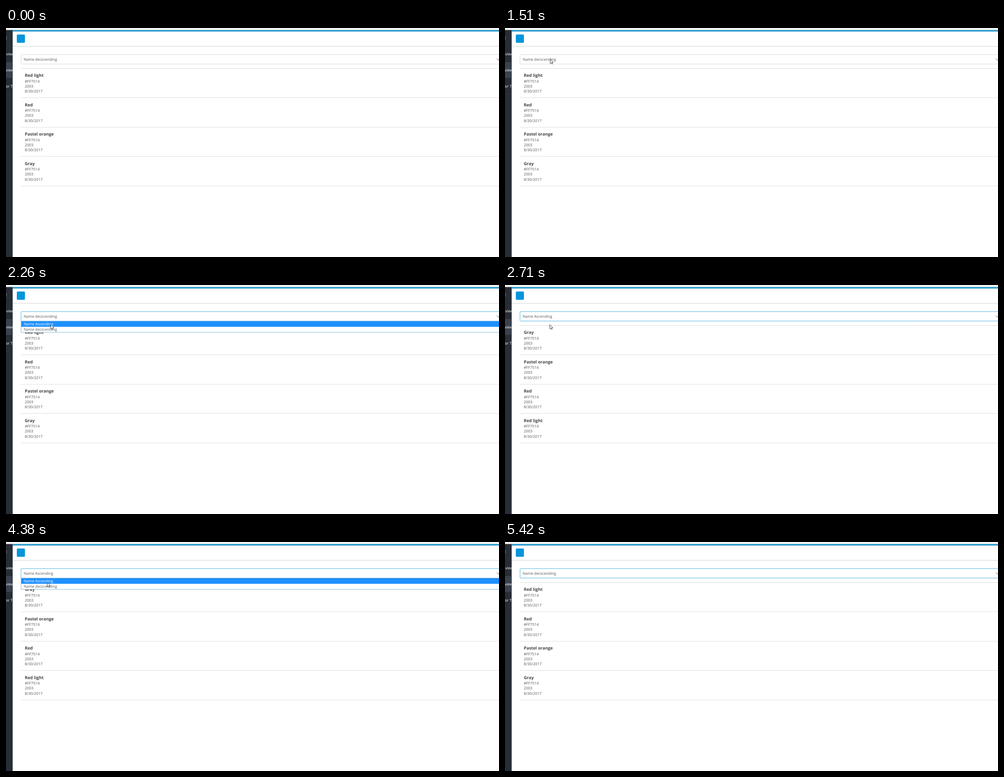
These frames come from a looping animation (1095x511 px, 6700 ms). An HTML page with a canvas:

```html
<!DOCTYPE html>
<html lang="en">
<head>
<meta charset="utf-8">
<title>Sorting a list</title>
<style>
html, body { margin: 0; width: 100%; height: 100%; overflow: hidden; background: #fff; }
canvas { display: block; }
</style>
</head>
<body>
<canvas id="stage" width="1095" height="511"></canvas>
<script>
const ctx = document.getElementById('stage').getContext('2d');
const LOOP = 6700, STEP = 56;
const OPTIONS = ['Name Ascending', 'Name decscending'];
const COLORS = ['Gray', 'Pastel orange', 'Red', 'Red light'];
const ARROW = new Path2D('M0 0V9.5L2.2 7.6 3.8 11 5.4 10.3 3.9 7H6.8Z');

// The pointer enters and leaves below the stage
const ENTRY = { x: 996, y: 528 };
const MOVES = [
  { start: 200, steps: 2, x: 508, y: 262 },
  { start: 480, steps: 3, x: 171, y: 70 },
  { start: 780, steps: 6, x: 136, y: 55 },
  { start: 1116, steps: 6, x: 102, y: 68 },
  { start: 1460, steps: 2, x: 99, y: 70 },
  { start: 2150, steps: 3, x: 99, y: 88 },
  { start: 3180, steps: 10, x: 92, y: 69 },
  { start: 4150, steps: 9, x: 91, y: 97 },
  { start: 4960, steps: 3, x: 558, y: 288 },
  { start: 5310, steps: 3, x: 1129, y: 520 }
];

const within = (t, from, to) => t >= from && t < to;
const easeOut = p => Math.sin(Math.min(1, p) * Math.PI / 2);

function pointerAt(t) {
  let { x, y } = ENTRY;
  for (const move of MOVES) {
    if (t < move.start) break;
    const step = Math.floor((t - move.start) / STEP + 0.05) + 1;
    const p = easeOut(step / move.steps);
    x += (move.x - x) * p;
    y += (move.y - y) * p;
  }
  return [Math.round(x), Math.round(y)];
}

function rect(color, x, y, w, h) {
  ctx.fillStyle = color;
  ctx.fillRect(x, y, w, h);
}

function text(str, x, y, color = '#555', font = '8.35px') {
  ctx.font = font + ' "Open Sans", sans-serif';
  ctx.fillStyle = color;
  ctx.fillText(str, x, y);
}

function roundBox(x, y, w, h, r) {
  ctx.beginPath();
  ctx.roundRect(x, y, w, h, r);
}

function drawHeader() {
  rect('#fff', 0, 0, 1095, 511);
  rect('#f1f5f5', 0, 0, 1095, 5);
  rect('#1994ca', 15, 4.6, 1080, 3.2);
  rect('#dedede', 15, 40, 1080, 1);
  rect('#eee', 15, 41, 1080, 1);
  ctx.fillStyle = '#0595db';
  roundBox(24, 14.5, 18, 18.5, 2);
  ctx.fill();
}

function drawSidebar() {
  ctx.save();
  ctx.beginPath();
  ctx.rect(0, 4.6, 14.8, 507);
  ctx.clip();
  rect('#272d36', 0, 4, 15, 507);
  rect('#39424e', 0, 76, 15, 35.5);
  rect('#2e353f', 0, 147, 15, 1);
  ['E', 'tview', 'view', 'or T'].forEach((label, i) =>
    text(label, i < 2 ? -2.5 : -0.5, 25.3 + i * 35.8, '#fff'));
  ctx.restore();
}

function drawList(names) {
  rect('#dcdcdc', 33, 90, 1062, 1);
  names.forEach((name, i) => {
    const top = 90 + i * 65.5;
    text(name, 41.7, top + 19.4, '#444', 'bold 9.5px');
    ['#FF7514', '2003', '8/30/2017'].forEach((line, j) =>
      text(line, 41.7, top + 31.5 + j * 11.3));
    rect('#dedede', 33, Math.round(top + 65.2), 1062, 1);
  });
}

function drawSelect(label, border) {
  ctx.strokeStyle = border;
  ctx.lineWidth = 1;
  roundBox(33.4, 59.4, 1070, 21, 1.5);
  ctx.stroke();
  text(label, 39.3, 73);
  ctx.strokeStyle = '#555';
  ctx.beginPath();
  ctx.moveTo(1090, 68);
  ctx.lineTo(1094, 72);
  ctx.lineTo(1098, 68);
  ctx.stroke();
}

function drawMenu(active) {
  rect('#fff', 33, 81, 1062, 25);
  ctx.strokeStyle = '#86b9da';
  ctx.strokeRect(33.5, 80.5, 1070, 25);
  rect('#1e90ff', 34, 81 + active * 12, 1061, 12.3);
  OPTIONS.forEach((name, i) =>
    text(name, 39.3, 90.3 + i * 12, i === active ? '#fff' : '#555'));
}

function drawPointer(x, y) {
  ctx.save();
  ctx.translate(x + 0.5, y + 0.5);
  ctx.fillStyle = '#fff';
  ctx.fill(ARROW);
  ctx.strokeStyle = '#333';
  ctx.lineWidth = 0.9;
  ctx.stroke(ARROW);
  ctx.restore();
}

function draw(t) {
  const selected = within(t, 2610, 4830) ? 0 : 1;
  const ascending = within(t, 2710, 4900);
  const open = within(t, 1810, 2610) || within(t, 4000, 4830);
  const border = t < 1810 ? '#d8d8d8' : t < 1850 ? '#93cbe6' : '#4ab4e2';
  const [x, y] = pointerAt(t);

  drawHeader();
  drawSidebar();
  drawList(ascending ? COLORS : [...COLORS].reverse());
  drawSelect(OPTIONS[selected], border);
  if (open) drawMenu(y < 81 ? selected : y < 93 ? 0 : 1);
  drawPointer(x, y);
}

ctx.textRendering = 'geometricPrecision';
const begin = performance.now();
function tick() {
  draw((performance.now() - begin) % LOOP);
  requestAnimationFrame(tick);
}
tick();
</script>
</body>
</html>
```
